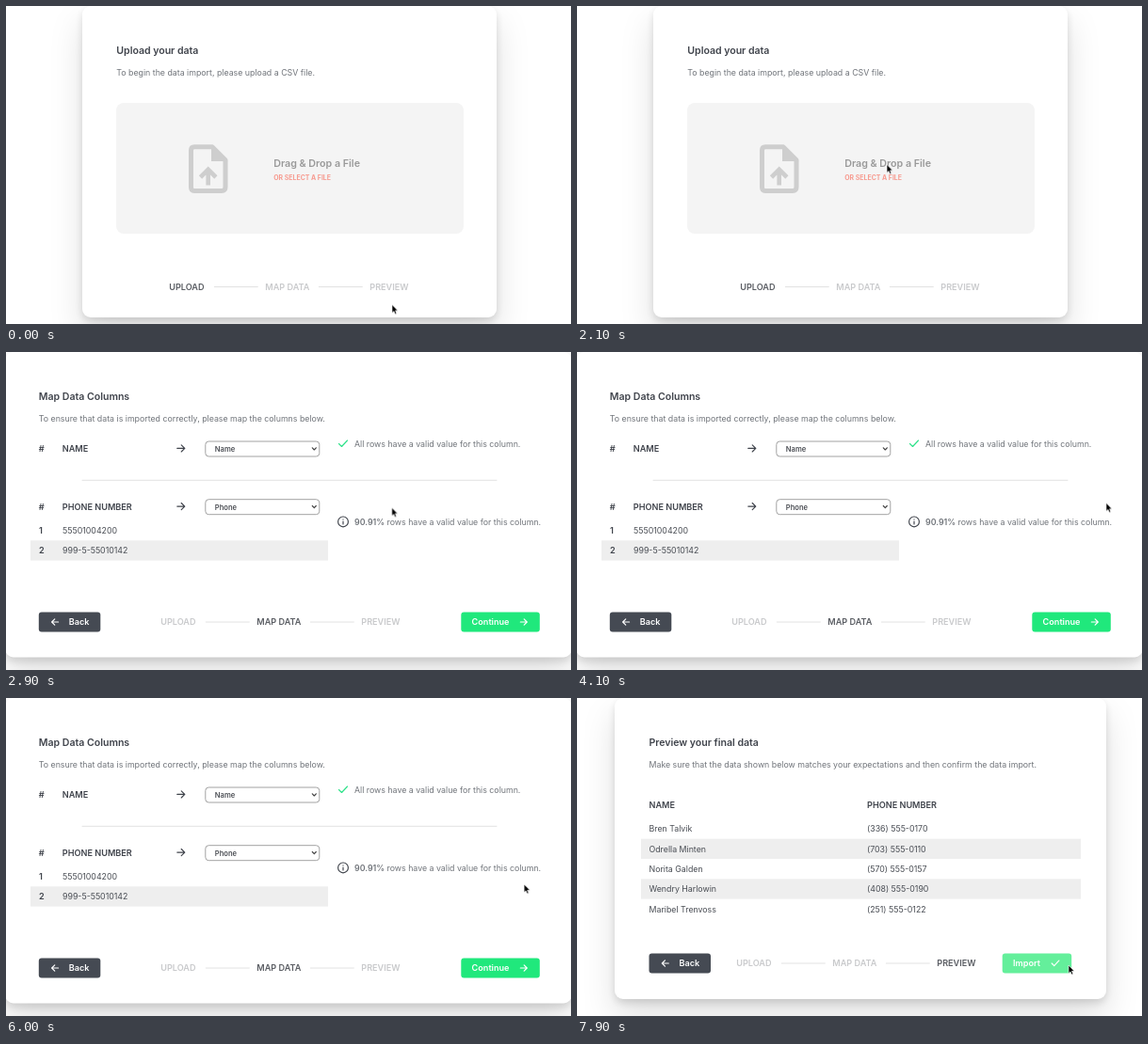
These frames come from a looping animation (600 by 338 pixels, 8000 ms). An HTML page:

```html
<!DOCTYPE html>
<html lang="en">
<head>
<meta charset="utf-8">
<title>Data import</title>
<style>
  html, body { margin: 0; width: 100%; height: 100%; overflow: hidden; background: #fff; }
  svg { display: block; width: 100vw; height: 100vh; }
  text { font: 400 8.8px Inter, "Open Sans", sans-serif; fill: #70747a; white-space: pre; }
  .title { font-size: 10.55px; font-weight: 600; fill: #3f434b; }
  .label { font-size: 9.15px; font-weight: 600; fill: #3f434b; }
  .cell { fill: #484c53; }
  .step { font-size: 9.1px; font-weight: 600; fill: #c9cacc; }
  .step.on { fill: #5a5d63; }
  .option { font-size: 7.6px; font-weight: 600; fill: #4b4e54; }
  .button { font-size: 9.1px; font-weight: 600; fill: #fff; }
  .drop { font-size: 10.7px; font-weight: 600; fill: #999; }
  .pick { font-size: 6.95px; font-weight: 700; fill: #f79b90; }
  .strong { font-weight: 600; }
  .card { fill: #fff; filter: drop-shadow(0 4px 4px rgba(0, 0, 0, .13)) drop-shadow(0 18px 17px rgba(0, 0, 0, .12)); }
  .line { fill: none; stroke-width: 1.15; stroke-linecap: round; stroke-linejoin: round; }

  .scene { visibility: hidden; animation: 8s step-end infinite; }
  #upload { animation-name: upload; }
  #map { animation-name: map; }
  #named { animation-name: named; }
  #mapped { animation-name: mapped; }
  #loading { animation-name: loading; }
  #preview { animation-name: preview; }
  @keyframes upload { 0% { visibility: visible } 30%, 100% { visibility: hidden } }
  @keyframes map { 0% { visibility: hidden } 30% { visibility: visible } 33.75%, 100% { visibility: hidden } }
  @keyframes named { 0% { visibility: hidden } 33.75% { visibility: visible } 36.25%, 100% { visibility: hidden } }
  @keyframes mapped { 0% { visibility: hidden } 36.25% { visibility: visible } 82.5%, 100% { visibility: hidden } }
  @keyframes loading { 0% { visibility: hidden } 82.5% { visibility: visible } 88.75%, 100% { visibility: hidden } }
  @keyframes preview { 0% { visibility: hidden } 88.75%, 100% { visibility: visible } }

  .next { fill: #20e87c; animation: hover 8s step-end infinite; }
  @keyframes hover { 0% { fill: #20e87c } 80%, 100% { fill: #64ef9b } }

  .spinner { transform-origin: 547px 288px; animation: spin .8s -.3s linear infinite; }
  @keyframes spin { to { transform: rotate(360deg) } }

  #cursor { animation: move 8s ease-in-out infinite; }
  @keyframes move {
    0%, 18.75% { transform: translate(410px, 317.5px) }
    26.25% { transform: translate(329px, 168.5px) }
    31.25%, 33.75% { transform: translate(333px, 168px) }
    40%, 60% { transform: translate(562px, 160.5px) }
    65%, 71.25% { transform: translate(562px, 162px) }
    81.25%, 100% { transform: translate(522px, 284px) }
  }
</style>
</head>
<body>
<svg id="stage" viewBox="0 0 600 338"></svg>
<script>
const text = (x, y, value, type = '') => `<text class="${type}" x="${x}" y="${y + 3.2}">${value}</text>`;
const rect = (x, y, w, h, fill, r = 0, type = '') =>
  `<rect class="${type}" x="${x}" y="${y}" width="${w}" height="${h}" rx="${r}" fill="${fill}"/>`;
const path = (d, color, style = '', type = '') =>
  `<path class="line ${type}" d="${d}" stroke="${color}" style="${style}"/>`;
const rule = (x1, x2, y) => path(`M${x1} ${y}H${x2}`, '#e2e2e2', 'stroke-width:1');
const card = (left, right, bottom) => rect(left, 0, right - left, bottom, '#fff', 9, 'card');
const scene = (id, ...parts) => `<g id="${id}" class="scene">${parts.join('')}</g>`;

const arrow = (x, y, color, size = 4, dir = 1) => {
  const head = size * .9;
  return path(`M${x - size * dir} ${y}h${2 * size * dir}m${-head * dir} ${-head}l${head * dir} ${head}l${-head * dir} ${head}`, color);
};
const check = (x, y, color, size = 1) =>
  path(`M${x - 4.5 * size} ${y}l${3 * size} ${3 * size}l${6 * size} ${-6.5 * size}`, color);

const heading = (x, title, note) => text(x, 47.6, title, 'title') + text(x, 70.6, note);

const steps = (x, y, active) =>
  ['UPLOAD', 'MAP DATA', 'PREVIEW']
    .map((name, i) => text(x + [0, 102, 213][i], y, name, i === active ? 'step on' : 'step')).join('') +
  rule(x + 48, x + 94, y) + rule(x + 159, x + 205, y);

const back = (x, y) =>
  rect(x, y - 10.5, 65.5, 21, '#454a53', 3) + arrow(x + 17.3, y, '#fff', 3.5, -1) + text(x + 32, y, 'Back', 'button');

const next = (x, y) =>
  rect(x, y - 10.5, 83.5, 21, '#20e87c', 3, 'next') +
  text(x + 11.3, y, 'Continue', 'button') + arrow(x + 66.5, y, '#fff', 3.5);

const mapping = (x, y, name, option) =>
  text(x, y, '#', 'label') + text(x + 25, y, name, 'label') + arrow(x + 151, y - .6, '#3f434b') +
  `<rect x="${x + 177}" y="${y - 8}" width="121" height="16" rx="3.5" fill="#fff" stroke="#a2a2a2"/>` +
  text(x + 187, y, option, 'option') +
  path(`M${x + 290.5} ${y - 1.2}l2 2.2l2 -2.2`, '#444');

const mapFields = (x, dividerLeft, dividerRight, first, second) =>
  heading(x, 'Map Data Columns', 'To ensure that data is imported correctly, please map the columns below.') +
  mapping(x, 103, 'NAME', first) + rule(dividerLeft, dividerRight, 136.3) +
  mapping(x, 164.7, 'PHONE NUMBER', second);

const nameValid = check(358, 97.5, '#2fe28a') + text(370, 97.8, 'All rows have a valid value for this column.');

const phoneReport =
  rect(26, 200.3, 316, 21.3, '#eee') +
  ['55501004200', '999-5-55010142'].map((number, i) =>
    text(35, 190 + i * 21.2, i + 1, 'label') + text(60, 190 + i * 21.2, number, 'cell')).join('') +
  '<circle class="line" cx="358" cy="180.4" r="5.4" stroke="#3f434b"/>' +
  path('M358 180v3M358 177.8v.1', '#3f434b') +
  text(370, 181, '<tspan class="strong">90.91%</tspan> rows have a valid value for this column.');

const fileIcon =
  path('M200 149.7H219L233 163.7V192.5Q233 196.5 229 196.5H200Q196.5 196.5 196.5 192.5V153.5Q196.5 149.7 200 149.7Z',
    '#cecece', 'stroke-width:5') +
  '<path d="M218 150V165H233Z" fill="#cecece"/>' +
  path('M214.7 190.5V174M206.5 182L214.7 173.8L222.9 182', '#cecece',
    'stroke-width:4.6;stroke-linecap:butt;stroke-linejoin:miter');

const people = [
  ['Bren Talvik', '(336) 555-0170'],
  ['Odrella Minten', '(703) 555-0110'],
  ['Norita Galden', '(570) 555-0157'],
  ['Wendry Harlowin', '(408) 555-0190'],
  ['Maribel Trenvoss', '(251) 555-0122'],
];
const table = people.map(([name, phone], i) => {
  const y = 139 + i * 21.35;
  return (i % 2 ? rect(68, y - 10.7, 467, 21.3, '#eee') : '') +
    text(76.5, y, name, 'cell') + text(308, y, phone, 'cell');
}).join('');

document.getElementById('stage').innerHTML = [
  scene('upload', card(81, 521, 331),
    heading(117.3, 'Upload your data', 'To begin the data import, please upload a CSV file.'),
    rect(117, 103, 369, 139, '#f4f4f4', 8), fileIcon,
    text(284.2, 167.5, 'Drag &amp; Drop a File', 'drop'),
    text(284.2, 181.8, 'OR SELECT A FILE', 'pick'),
    steps(173.3, 298.5, 0)),

  scene('map', card(35, 567, 282),
    mapFields(71.3, 118, 486, 'AnnualRevenue', 'AnnualRevenue'),
    back(71.3, 244.5), steps(164.3, 244.5, 1), next(446.5, 244.5)),

  scene('named', card(-1, 601, 282),
    mapFields(34.8, 81, 521, 'Name', 'AnnualRevenue'), nameValid,
    back(34.8, 244.5), steps(164.3, 244.5, 1), next(483.3, 244.5)),

  scene('mapped', card(-1, 601, 324.5),
    mapFields(34.8, 81, 521, 'Name', 'Phone'), nameValid, phoneReport,
    back(34.8, 287), steps(164.3, 287, 1), next(483.3, 287)),

  scene('loading', card(-1, 601, 327),
    mapFields(34.8, 81, 521, 'Name', 'Phone'), nameValid, phoneReport,
    back(34.8, 288), steps(163.2, 288, 1),
    rect(480.7, 276.5, 86.3, 23, '#64ef9b', 3), text(492, 288, 'Continue', 'button'),
    path('M547 283a5 5 0 0 1 4 8', '#fff', 'stroke-width:1', 'spinner')),

  scene('preview', card(40, 562, 320),
    heading(76.5, 'Preview your final data',
      'Make sure that the data shown below matches your expectations and then confirm the data import.'),
    text(76.5, 113.5, 'NAME', 'label'), text(308, 113.5, 'PHONE NUMBER', 'label'), table,
    back(76.5, 282), steps(169.3, 282, 2),
    rect(451.7, 271.5, 73.5, 21, '#64ef9b', 3), text(463, 282, 'Import', 'button'), check(508, 282, '#fff', .85)),

  `<path id="cursor" d="M0 0V8.6L2 6.9L3.3 9.9L4.8 9.2L3.5 6.3H6.1Z" fill="#000" stroke="#fff" stroke-width=".6"/>`,
].join('');
</script>
</body>
</html>
```
